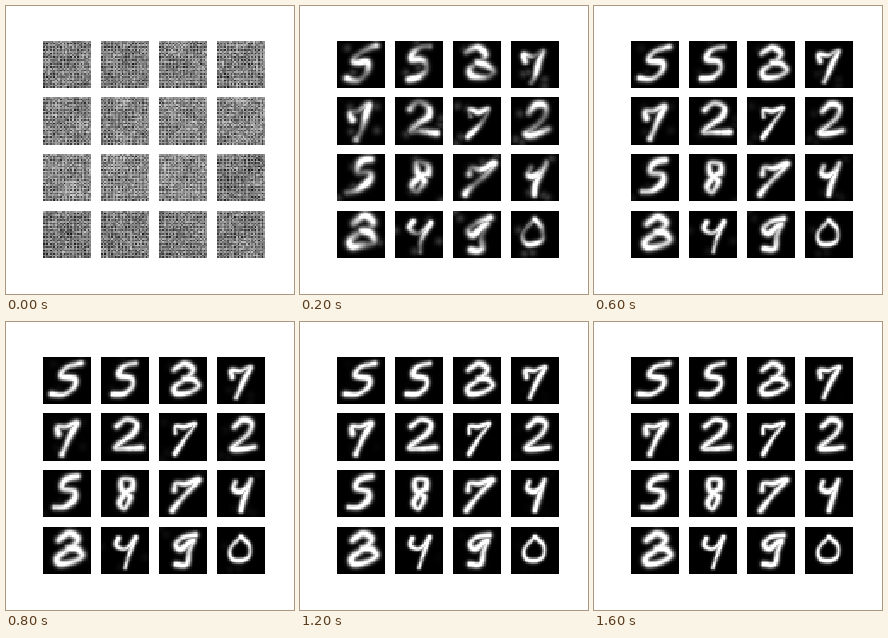
An HTML page with a canvas that plays this animation: 288 px wide and 288 px high, repeating every 1.8 s.

```html
<!DOCTYPE html>
<html lang="en">
<head>
<meta charset="utf-8">
<title>Generated digits</title>
<style>
html, body { margin: 0; width: 100%; height: 100%; overflow: hidden; background: #fff; }
canvas { display: block; width: 288px; height: 288px; }
</style>
</head>
<body>
<canvas id="stage" width="288" height="288"></canvas>
<script>
const LOOP = 1800, STEP = 100, LAST = 16, SIZE = 28, MID = 14;
const stage = document.getElementById('stage').getContext('2d');
stage.imageSmoothingEnabled = false;
const tile = document.createElement('canvas');
tile.width = tile.height = SIZE;
const pen = tile.getContext('2d');
const pixels = pen.createImageData(SIZE, SIZE);

// Key points of one handwritten stroke per shape, on a 28 x 28 tile
const shapes = {
  zero: '14,6 8,13 9,19 15,20 19,17 19,11 14,6',
  two: '10,8 15,4 20,6 18,12 9,20 14,21 22,20',
  loop: '9,8 15,4 20,7 17,12 9,18 10,22 17,21 23,17 20,13 15,13',
  five: '20,4 13,6 11,11 18,13 18,18 13,22 7,22',
  seven: '9,12 9,8 14,8 20,6 16,13 13,19 11,24',
  eight: '18,11 18,6 12,6 12,12 17,16 14,23 11,20 14,14 18,11',
  nine: '21,5 14,6 10,10 13,13 20,8 18,14 16,22 10,22',
  fork: '10,7 9,11 13,13 17,11 20,6 17,15 14,24'
};

const digits = [];
function digit(name, { lean = 0, stretch = 1, weight = 1 } = {}) {
  const points = shapes[name].split(' ').map(pair => {
    const [x, y] = pair.split(',').map(Number);
    return [MID + (x - MID) * stretch + lean * (MID - y), y];
  });
  digits.push({ path: smooth(points), weight });
}

// Catmull-Rom samples through the key points
function smooth(points) {
  const samples = [], steps = 8;
  for (let i = 0; i < points.length - 1; i++) {
    const a = points[i], b = points[i + 1];
    const before = points[i - 1] || a, after = points[i + 2] || b;
    for (let s = 0; s <= steps; s++) {
      const t = s / steps;
      samples.push([0, 1].map(n => a[n] + t / 2 * (b[n] - before[n]
        + t * (2 * before[n] - 5 * a[n] + 4 * b[n] - after[n]
        + t * (3 * (a[n] - b[n]) + after[n] - before[n])))));
    }
  }
  return samples;
}

digit('five', { lean: .12, stretch: 1.15 });
digit('five');
digit('loop');
digit('seven', { weight: .85 });

digit('seven');
digit('two', { stretch: 1.15 });
digit('seven', { lean: .15, weight: .75 });
digit('two');

digit('five', { weight: 1.1 });
digit('eight');
digit('seven', { lean: .25, stretch: 1.15 });
digit('fork', { stretch: .9, weight: .9 });

digit('loop', { weight: 1.2 });
digit('fork', { weight: .75 });
digit('nine');
digit('zero', { weight: .75 });

function seeded(seed) {
  return () => {
    seed = (seed * 1664525 + 1013904223) >>> 0;
    return seed / 4294967296;
  };
}

function paint(toneAt) {
  for (let i = 0; i < SIZE * SIZE; i++) {
    const tone = toneAt(i % SIZE, Math.floor(i / SIZE));
    pixels.data.set([tone, tone, tone, 255], i * 4);
  }
  pen.putImageData(pixels, 0, 0);
}

// Untrained output: soft grain on a two-pixel lattice
function drawNoise(random) {
  const level = 128 + 20 * (random() - .5), phase = 6 * random();
  paint((x, y) => {
    const lattice = y % 2 ? (x % 2 ? 15 : -48) : 20;
    const patch = 10 * Math.sin(x / 4 + phase) * Math.sin(y / 4 - phase);
    return level + lattice + patch + 55 * (random() + random() - 1);
  });
}

// Warp, broken ink and blur fade away as training goes on
function drawDigit({ path, weight }, random, frame) {
  const rough = Math.exp((2 - frame) / 4);
  const [bendX, bendY, gap] = [0, 0, 0].map(() => 2 * Math.PI * random());
  const marks = path.map(([x, y], i) => {
    const wave = .5 + .5 * Math.sin(i / 5 + gap);
    return {
      x: x + 1.3 * rough * Math.sin(y / 4 + bendX),
      y: y + 1.3 * rough * Math.sin(x / 4 + bendY),
      radius: 1.65 * weight + .3 * wave + .3 * rough,
      ink: 1.25 * (1 - (.15 + .5 * rough) * (1 - wave))
    };
  });
  // Stray grey wisps of the early images
  for (let i = 0; i < 4; i++) {
    marks.push({ x: SIZE * random(), y: SIZE * random(), radius: 2.5, ink: .2 * rough });
  }
  paint((x, y) => {
    let light = 0;
    for (const mark of marks) {
      const far = Math.hypot(x + .5 - mark.x, y + .5 - mark.y) / mark.radius;
      light = Math.max(light, mark.ink * Math.exp(-far * far));
    }
    return 255 * light;
  });
}

function draw(frame) {
  stage.fillStyle = '#fff';
  stage.fillRect(0, 0, 288, 288);
  digits.forEach((item, index) => {
    const random = seeded(index * 7919 + 17);
    const left = 37 + 58 * (index % 4);
    const edge = 34.56 + 56.72 * Math.floor(index / 4);
    const top = Math.round(edge), bottom = Math.round(edge + 47.27);
    if (frame) drawDigit(item, random, frame);
    else drawNoise(random);
    stage.drawImage(tile, left, top, 48, bottom - top);
  });
}

const begin = performance.now();
let shown = -1;
function tick() {
  const time = (performance.now() - begin) % LOOP;
  const frame = Math.min(LAST, Math.floor(time / STEP));
  if (frame !== shown) draw(shown = frame);
  requestAnimationFrame(tick);
}
tick();
</script>
</body>
</html>
```
